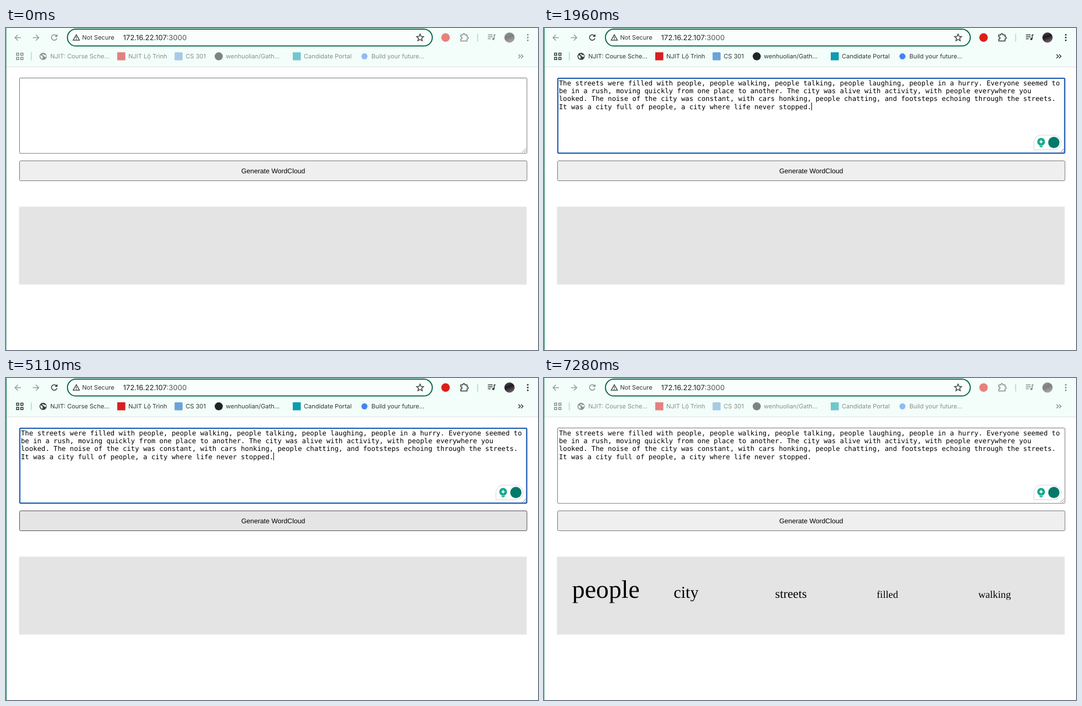
Animation, 961 px wide and 583 px high, one loop 8000 ms. Source, as an HTML page:

```html
<!DOCTYPE html>
<html lang="en">
<head>
<meta charset="utf-8">
<title>WordCloud</title>
<style>
html, body { margin: 0; width: 100%; height: 100%; overflow: hidden; background: #fff; }
svg { display: block; width: 100vw; height: 100vh; }
text { text-rendering: geometricPrecision; white-space: pre; }
.ui { font: 11px Inter, Roboto, sans-serif; fill: #2f3835; }
.url { font-size: 13px; fill: #1c2421; }
.mono { font: 12.22px "DejaVu Sans Mono", "Liberation Mono", monospace; fill: #000; }
.label { font: 12.22px "Liberation Sans", Arial, sans-serif; text-anchor: middle; }
.words { font-family: "Liberation Serif", "Times New Roman", serif; }
.line { fill: none; stroke: #2f3835; stroke-width: 1.5; }
.soft { stroke: #929b97; }

/* every animation shares one 8 s clock */
.active, .focus, .startCaret, .caret, .bubble, .badge, .pasted, .button, .loading {
  animation: 8s step-end infinite;
}
.active { animation-name: active; }
.focus { animation-name: focus; }
.startCaret { animation-name: startCaret; }
.caret { animation-name: caret; }
.bubble { animation-name: bubble; }
.badge { animation-name: badge; }
.pasted { animation-name: pasted; }
.button { animation-name: button; }
.loading { animation-name: loading; }
.spin { animation: spin 8s linear infinite; }
.words text { animation: grow 8s infinite; }

@keyframes active { 0%, 90.125% { opacity: .56; } 7% { opacity: 1; } }
@keyframes focus { 0%, 69.125% { opacity: 0; } 15.75% { opacity: 1; } }
@keyframes startCaret { 0%, 22.75% { opacity: 0; } 15.75% { opacity: 1; } }
@keyframes caret {
  0%, 32.375%, 44.625%, 57.75%, 69.125% { opacity: 0; }
  24.5%, 38.5%, 50.75%, 63.875% { opacity: 1; }
}
@keyframes bubble { 0%, 22.75% { opacity: 0; } 18.375% { opacity: 1; } }
@keyframes badge { 0% { opacity: 0; } 21%, 100% { opacity: 1; } }
@keyframes pasted { 0% { opacity: 0; } 22.75%, 100% { opacity: 1; } }
@keyframes button {
  0%, 58.625%, 85.75% { fill: #efefef; stroke: #767676; }
  40.625%, 62.125%, 70.875% { fill: #e5e5e5; stroke: #4f4f4f; }
  69.125% { fill: #f5f5f5; stroke: #8d8d8d; }
}
@keyframes loading { 0%, 54.25% { opacity: 0; } 28% { opacity: 1; } }
@keyframes spin {
  0%, 28% { transform: rotate(-230deg); }
  50.75%, 100% { transform: rotate(513deg); }
}
/* cubic in-out, one half per segment */
@keyframes grow {
  0% { transform: scale(0); }
  69.85% { transform: scale(0); animation-timing-function: cubic-bezier(.3333, 0, .6667, 0); }
  76.1% { transform: scale(.5); animation-timing-function: cubic-bezier(.3333, 1, .6667, 1); }
  82.35%, 100% { transform: scale(1); }
}
</style>
</head>
<body>
<svg viewBox="0 0 961 583" preserveAspectRatio="none">
  <defs>
    <linearGradient id="photo" x2=".4" y2="1">
      <stop stop-color="#55505a"/><stop offset=".5" stop-color="#1d1a20"/><stop offset="1" stop-color="#6a5a62"/>
    </linearGradient>
  </defs>

  <!-- browser bars -->
  <rect width="961" height="70" fill="#f3fdf9"/>
  <path d="M0 70.5H961" stroke="#dde3e0"/>
  <rect x="111" y="2" width="659" height="30.6" rx="15.3" fill="#f8fffc" stroke="#0c6b4b" stroke-width="2"/>

  <g class="line soft">
    <path d="M27 17.5H16.5M21.5 12.3L16.3 17.5L21.5 22.7"/>
    <path d="M48.500 17.500H59M54 12.300L59.200 17.500L54 22.700"/>
  </g>
  <g class="line">
    <path d="M127 12L132.700 22.200H121.300Z M127 15.500V18.800M127 19.800V21.200" stroke-width="1.300"/>
    <path d="M748 11l1.800 4.200 4.500.4-3.400 3 1 4.400-3.900-2.300-3.900 2.300 1-4.400-3.400-3 4.500-.4Z" stroke-width="1.400"/>
  </g>
  <text class="ui" x="137.500" y="21">Not Secure</text>
  <text class="ui url" x="211.500" y="22">172.16.22.107<tspan fill="#4b5551">:3000</tspan></text>

  <g stroke="#aeeccd" stroke-width="2">
    <path d="M852 10.500V24.500M45.700 44V58.500"/>
  </g>

  <g class="active">
    <path class="line" d="M91.300 14.300A5 5 0 1 0 92 18.500M92.200 11.800V15.300H88.500"/>
    <circle cx="794" cy="17.300" r="7.700" fill="#dc1f1a"/>
    <path class="line" d="M821.500 12.500H825.300C825 9.300 829.300 9.300 829 12.500H832.800V16C835.800 15.800 835.800 20 832.800 19.800V23.500H821.500V20C824.500 19.800 824.500 16.200 821.500 16Z"/>
    <path class="line" d="M870.500 12.500H879M870.500 16H879M870.500 19.500H875.500M881.800 20V12.500H884.500"/>
    <circle cx="880.200" cy="20" r="2" fill="#2f3835"/>
    <circle cx="909.500" cy="17.300" r="9.200" fill="url(#photo)"/>
    <g fill="#2f3835">
      <circle cx="942.500" cy="12.300" r="1.500"/><circle cx="942.500" cy="17.300" r="1.500"/><circle cx="942.500" cy="22.300" r="1.500"/>
    </g>

    <path class="line" stroke-width="1.400" d="M19 45.500h4v4h-4ZM26.700 45.500h4v4h-4ZM19 53.200h4v4h-4ZM26.700 53.200h4v4h-4Z"/>
    <circle cx="67" cy="51.300" r="6.500" fill="#3b4340"/>
    <path d="M62 49.500q3 0 4 2t-1 4.500q-3-2-3-6.500M66 46.500q2 2.500 6 2.500l.5 3q-3 1-4-1t-3-2Z" fill="#f3fdf9"/>
    <rect x="201" y="44" width="14.500" height="14.500" fill="#d91f22"/>
    <rect x="304.500" y="44" width="14.500" height="14.500" rx="1.500" fill="#6ba3d8"/>
    <circle cx="384.300" cy="51.300" r="7.300" fill="#202428"/>
    <rect x="518" y="44" width="14.500" height="14.500" fill="#0d9cb0"/>
    <circle cx="647.500" cy="51.300" r="5.500" fill="#4285f4"/>
    <g class="ui">
      <text x="80" y="55">NJIT: Course Sche...</text>
      <text x="221" y="55">NJIT Lộ Trình</text>
      <text x="324.500" y="55">CS 301</text>
      <text x="397" y="55">wenhuolian/Gath...</text>
      <text x="538" y="55">Candidate Portal</text>
      <text x="660" y="55">Build your future...</text>
    </g>
    <path class="line" stroke-width="1.300" d="M925.700 47.800l3.500 3.500-3.500 3.500M930.400 47.800l3.500 3.500-3.500 3.500"/>
  </g>

  <!-- text box -->
  <rect x="24.500" y="90.500" width="916.500" height="136.500" rx="1.500" fill="#fff" stroke="#767676"/>
  <rect class="focus" x="25" y="91" width="915.500" height="135.500" rx="1.500" fill="none" stroke="#1557ae" stroke-width="2"/>
  <path d="M932.500 225.500L939.500 218.500M936.500 225.500L939.500 222.500" stroke="#777" stroke-width=".9"/>
  <path class="startCaret" d="M27.500 93V107" stroke="#000"/>
  <g class="mono pasted">
    <text x="27" y="104">The streets were filled with people, people walking, people talking, people laughing, people in a hurry. Everyone seemed to</text>
    <text x="27" y="118.200">be in a rush, moving quickly from one place to another. The city was alive with activity, with people everywhere you</text>
    <text x="27" y="132.400">looked. The noise of the city was constant, with cars honking, people chatting, and footsteps echoing through the streets.</text>
    <text x="27" y="146.600">It was a city full of people, a city where life never stopped.</text>
  </g>
  <path class="caret" d="M483.500 135V149" stroke="#000"/>

  <!-- writing helper -->
  <circle class="bubble" cx="921" cy="207" r="13.300" fill="#fff" stroke="#d5d8dc"/>
  <g class="pasted">
    <path d="M885 220.500V207A13 13 0 0 1 898 194H921A13.250 13.250 0 0 1 921 220.500Z" fill="#fff" stroke="#d3d6da"/>
    <circle cx="898" cy="206" r="7" fill="#15a88b"/>
    <path d="M895 211h6v4q-3 2-6 0Z" fill="#15a88b"/>
    <path d="M894.500 213.200h7" stroke="#fff" stroke-width=".8"/>
    <path d="M898 201.800Q898.600 205.400 902.200 206Q898.600 206.600 898 210.200Q897.400 206.600 893.800 206Q897.400 205.400 898 201.800Z" fill="#fff"/>
  </g>
  <g transform="translate(921 207.300)">
    <circle class="badge" r="10.200" fill="#04796a"/>
    <g class="loading">
      <path class="spin" d="M4.800 -5.700A7.500 7.500 0 0 1 4.800 5.700" fill="none" stroke="#fff" stroke-width="1.400" stroke-linecap="round"/>
    </g>
  </g>

  <!-- button and cloud -->
  <rect class="button" x="24.500" y="240.500" width="916.500" height="36" rx="2"/>
  <text class="label" x="482.700" y="262.600">Generate WordCloud</text>
  <rect x="23.500" y="323.500" width="917" height="141" fill="#e4e4e4"/>
  <g class="words">
    <g transform="translate(50.800 397.500)"><text font-size="45.800">people</text></g>
    <g transform="translate(234.200 397.500)"><text font-size="30">city</text></g>
    <g transform="translate(417.600 397.500)"><text font-size="22.300">streets</text></g>
    <g transform="translate(601 397.500)"><text font-size="18.300">filled</text></g>
    <g transform="translate(784.400 397.500)"><text font-size="18.300">walking</text></g>
  </g>

  <path class="active" d="M.5 0V583" stroke="#0f6f50"/>
</svg>
</body>
</html>
```
